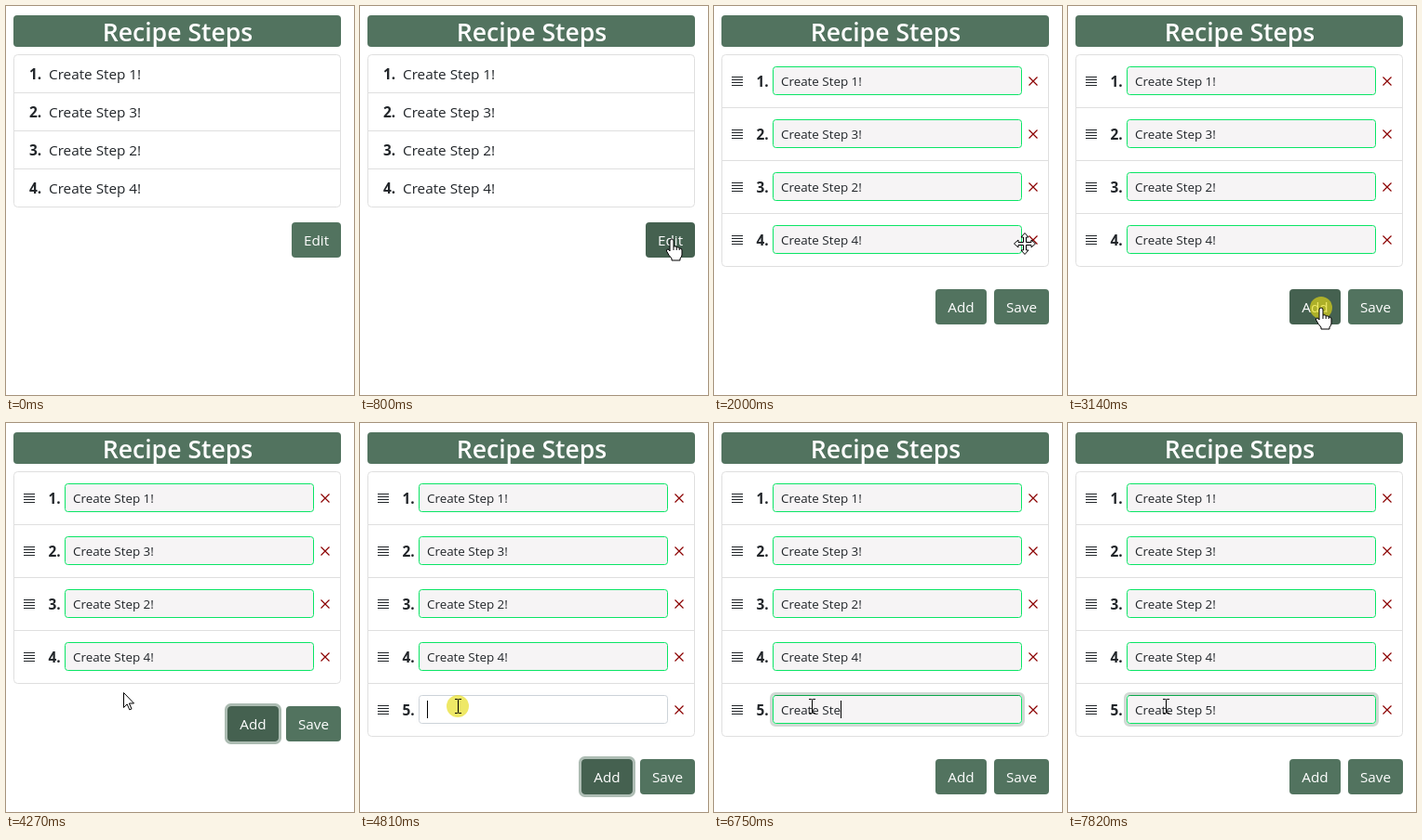
Recreate the animation shown at these times as an HTML page. Size 374 by 419 pixels, loop 8000 ms.

```html
<!DOCTYPE html>
<html lang="en">
<head>
<meta charset="utf-8">
<title>Recipe Steps</title>
<style>
  :root { --green: #52735f; --dark: #456150; --valid: #0ae565; --field: #f6f4f5; }
  html, body { margin: 0; width: 100%; height: 100%; overflow: hidden; background: #fff; }
  svg { display: block; width: 374px; height: 419px; font: 15.3px "Open Sans", "Noto Sans", sans-serif; }
  text { fill: #212529; white-space: pre; }
  .num { font-weight: 700; font-size: 15.4px; }
  .value { font-size: 13.4px; }
  .title { font-weight: 600; font-size: 26.6px; fill: #fff; text-anchor: middle; }
  .btn text { fill: #fff; text-anchor: middle; }
  .btn rect, .head { fill: var(--green); }
  .line { fill: none; stroke: #dfdfdf; }
  .field { fill: var(--field); stroke: var(--valid); }
  .grip { stroke: #212529; }
  .cross { stroke: #8b0000; stroke-width: 1.2; }
  .ring { fill: none; stroke: var(--green); stroke-width: 3; opacity: 0; }
  #caret { stroke: #000; }

  /* Hard switches */
  .view, .edit, #frame, #row5, #buttons, #pointer, #pointer * { animation: 8s step-end infinite; }
  .view { animation-name: view; }
  .edit { animation-name: edit; }
  #frame { animation-name: frame; }
  #row5 { animation-name: row5; }
  #buttons { animation-name: buttons; }
  @keyframes view { 0% { opacity: 1 } 20.125%, 100% { opacity: 0 } }
  @keyframes edit { 0% { opacity: 0 } 20.125%, 100% { opacity: 1 } }
  @keyframes frame { 0% { height: 228px } 54.25%, 100% { height: 285px } }
  @keyframes row5 { 0% { opacity: 0 } 54.25%, 100% { opacity: 1 } }
  @keyframes buttons { 0% { transform: none } 54.25%, 100% { transform: translateY(57px) } }

  /* Hover and focus fades */
  #editBtn rect, #addBtn .face, #addBtn .ring, #row5 .field, #row5 .focus { animation: 8s linear infinite; }
  #editBtn rect { animation-name: editHover; }
  #addBtn .face { animation-name: addHover; }
  #addBtn .ring { animation-name: addRing; }
  #row5 .field { animation-name: fieldTint; }
  #row5 .focus { animation-name: fieldFocus; }
  @keyframes editHover { 0%, 8.2% { fill: var(--green) } 9.8%, 100% { fill: var(--dark) } }
  @keyframes addHover {
    0%, 36.2% { fill: var(--green) }
    38%, 60.1% { fill: var(--dark) }
    62%, 100% { fill: var(--green) }
  }
  @keyframes addRing { 0%, 40% { opacity: 0 } 41.9%, 60.1% { opacity: .48 } 62%, 100% { opacity: 0 } }
  @keyframes fieldTint {
    0%, 60.1% { fill: #fff; stroke: #ced4da }
    62%, 70.1% { fill: #fff; stroke: #9bb3a5 }
    73.5% { fill: #fff; stroke: var(--valid) }
    76%, 100% { fill: var(--field); stroke: var(--valid) }
  }
  @keyframes fieldFocus { 0%, 60.1% { opacity: 0 } 62%, 100% { opacity: .27 } }

  /* Pointer */
  #pointer { animation-name: move; animation-timing-function: linear; }
  #pointer * { opacity: 0; fill: #fff; stroke: #000; stroke-linejoin: round; }
  #pointer #click { fill: #e6dc14; stroke: none; animation-name: click; }
  #arrow { animation-name: arrow; }
  #hand { animation-name: hand; }
  #drag { animation-name: drag; }
  #pointer #beam { fill: none; animation-name: beam; }
  @keyframes move {
    0%, 2.6% { transform: translate(300px, 396px); animation-timing-function: ease-out }
    10%, 20.1% { transform: translate(335px, 251px) }
    20.125%, 24.99% { transform: translate(334px, 252px) }
    25%, 31.7% { transform: translate(334px, 256px); animation-timing-function: ease-in-out }
    38.375%, 42.6% { transform: translate(272px, 325px); animation-timing-function: ease-out }
    45%, 54.2% { transform: translate(126px, 290px); animation-timing-function: ease-in-out }
    59.25%, 100% { transform: translate(105px, 305px) }
  }
  @keyframes click {
    0% { opacity: 0 }
    18.375% { opacity: .65 } 20.125% { opacity: 0 }
    38.375% { opacity: .65 } 40% { opacity: 0 }
    59.25% { opacity: .65 } 60.875%, 100% { opacity: 0 }
  }
  @keyframes arrow {
    0% { opacity: 0 }
    3.375% { opacity: 1 } 8.2% { opacity: 0 }
    34.4% { opacity: 1 } 36.2% { opacity: 0 }
    43.3% { opacity: 1 } 55.5%, 100% { opacity: 0 }
  }
  @keyframes hand {
    0% { opacity: 0 }
    8.2% { opacity: 1 } 20.125% { opacity: 0 }
    36.2% { opacity: 1 } 43.3%, 100% { opacity: 0 }
  }
  @keyframes drag { 0% { opacity: 0 } 20.125% { opacity: 1 } 34.4%, 100% { opacity: 0 } }
  @keyframes beam { 0% { opacity: 0 } 55.5%, 100% { opacity: 1 } }
</style>
</head>
<body>
<svg viewBox="0 0 374 419">
  <rect class="head" x="8" y="10" width="352" height="34" rx="4"/>
  <text class="title" x="184.5" y="38">Recipe Steps</text>

  <g class="view">
    <rect class="line" x="8.5" y="52.5" width="351" height="164" rx="4"/>
    <g id="viewRows"></g>
    <g class="btn" id="editBtn">
      <rect x="307" y="233" width="53" height="38" rx="4"/>
      <text x="333.5" y="258">Edit</text>
    </g>
  </g>

  <g class="edit">
    <rect class="line" id="frame" x="8.5" y="52.5" width="351" height="228" rx="4"/>
    <g id="editRows"></g>
    <g class="btn" id="buttons">
      <g id="addBtn">
        <rect class="ring" style="fill:none" x="236.5" y="303.5" width="58" height="41" rx="5"/>
        <rect class="face" x="238" y="305" width="55" height="38" rx="4"/>
        <text x="265.5" y="330">Add</text>
      </g>
      <rect x="301" y="305" width="59" height="38" rx="4"/>
      <text x="330.5" y="330">Save</text>
    </g>
  </g>

  <g id="pointer">
    <circle id="click" r="12"/>
    <path id="arrow" d="M.5.5v16l3.7-3.6 2.6 6 2.2-1-2.6-5.9h5.1z"/>
    <path id="hand" d="M-2 2a2 2 0 0 1 4 0v6q3-1 3.2 1q2.6-1 3 1q2.8-.5 2.8 2v5q0 2-2 4v2h-9v-2q-3-3-5.5-8q-.5-2 1.5-2q1 0 2 2zM2 8v4M5.2 9v3M8.2 10v2"/>
    <path id="drag" d="M0-11.5L4-7H1.5v5.5H7V-4L11.5 0 7 4V1.5H1.5V7H4L0 11.5-4 7h2.5V1.5H-7V4L-11.5 0-7-4v2.5h5.5V-7H-4z"/>
    <path id="beam" d="M-3-7.5h2.5q1 0 1 1v13q0 1-1 1H-3M4-7.5H1.5q-1 0-1 1M4 7.5H1.5q-1 0-1-1"/>
  </g>
</svg>
<script>
const LOOP = 8000;
const byId = id => document.getElementById(id);
const steps = [1, 3, 2, 4].map(n => `Create Step ${n}!`);

const viewRow = (label, i) => `
  <g transform="translate(0 ${41 * i})">
    ${i ? '<path class="line" d="M8 52.5h352"/>' : ''}
    <text class="num" x="25" y="79">${i + 1}.</text>
    <text x="46" y="79">${label}</text>
  </g>`;

const editRow = (label, i) => `
  <g id="row${i + 1}" transform="translate(0 ${57 * i})">
    ${i ? '<path class="line" d="M8 52.5h352"/>' : ''}
    <path class="grip" d="M19 76.5h12m-12 3h12m-12 3h12m-12 3h12"/>
    <text class="num" x="45.5" y="87">${i + 1}.</text>
    ${i === 4 ? '<rect class="ring focus" x="61.5" y="63.5" width="271" height="34" rx="4.5"/>' : ''}
    <rect class="field" x="63.5" y="65.5" width="267" height="30" rx="3"/>
    <text class="value" x="72" y="86">${label}</text>
    <path class="cross" d="M338.5 76.5l9 9m0-9l-9 9"/>
    ${i === 4 ? '<path class="ring focus" style="stroke:#000;stroke-width:1" d="M65 65.5h264"/><path id="caret" d="M0 71v19"/>' : ''}
  </g>`;

byId('viewRows').innerHTML = steps.map(viewRow).join('');
byId('editRows').innerHTML = [...steps, ''].map(editRow).join('');

const typed = 'Create Step 5!';
const keyTimes = [5610, 5740, 5880, 5950, 6010, 6080, 6280, 6480, 6680, 6740, 6810, 6880, 7080, 7280];
const caretShown = t => (t >= 4810 && t < 5350) || (t >= 5610 && t < 7820);
const entry = document.querySelector('#row5 .value');
const caret = byId('caret');
const start = performance.now();

function render(now) {
  const t = Math.max(0, now - start) % LOOP;
  const text = typed.slice(0, keyTimes.filter(k => k <= t).length);
  if (entry.textContent !== text) entry.textContent = text;
  const width = text ? entry.getComputedTextLength() : 0;
  caret.setAttribute('transform', `translate(${Math.round(72 + width) + .5} 0)`);
  caret.style.opacity = caretShown(t) ? 1 : 0;
  requestAnimationFrame(render);
}
requestAnimationFrame(render);
</script>
</body>
</html>
```
